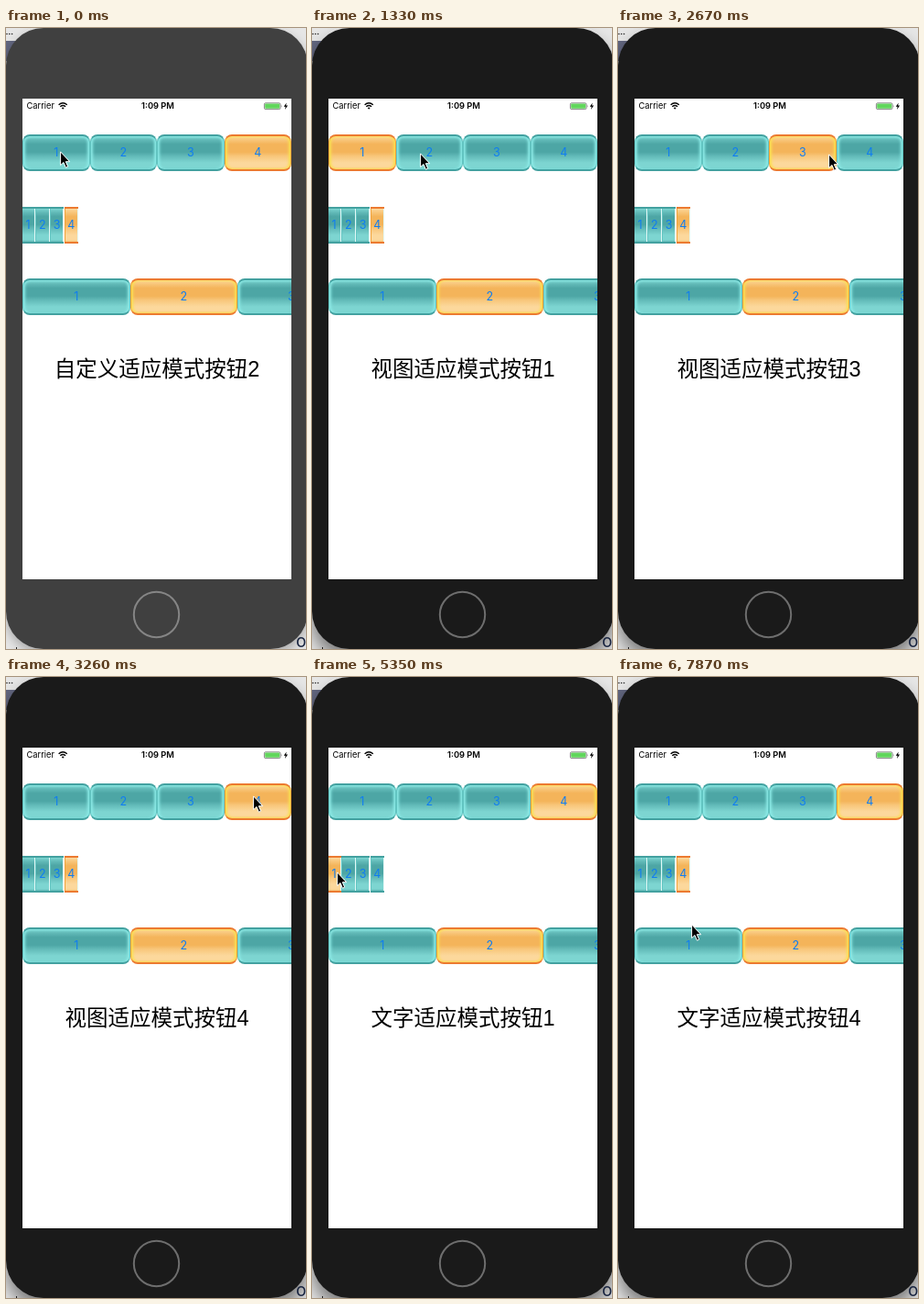
Animation of 328 by 677 pixels, one loop 8000 ms. Source, as an HTML page:

```html
<!DOCTYPE html>
<html lang="zh-CN">
<head>
<meta charset="utf-8">
<style>
html, body { margin: 0; width: 100%; height: 100%; overflow: hidden; background: #e6e6e6 }
svg { position: absolute; left: 0; top: 0 }
#phone { fill: #404040; filter: drop-shadow(0 5px 6px #0004) }
#home { fill: none; stroke: #858585; stroke-width: 2 }
.active #phone { fill: #1a1a1a; filter: drop-shadow(0 11px 9px #0007) }
.active #home { stroke: #6e6e6e }
#screen {
  position: absolute; left: 18px; top: 77px; width: 294px; height: 524px;
  overflow: hidden; background: #fff;
}
.b {
  --edge: #43a1a0; --side: #62c4c1; --glow: #8cebe7;
  --light: #7dd5d1; --mid: #62bab8; --dark: #4da6a5;
  position: absolute; box-sizing: border-box; height: 40px;
  border: solid; border-width: 2px 1px; border-color: var(--edge) var(--side); border-radius: 8px;
  font: 12.5px/36px Inter, sans-serif; text-align: center; color: #0f7df2;
  background: linear-gradient(var(--light), var(--mid) 11%, var(--dark) 24% 48%, var(--mid) 60%, var(--light) 80% 94%, var(--mid));
  box-shadow: inset 2px 0 3px var(--glow), inset -2px 0 3px var(--glow);
}
.b.on {
  --edge: #ec7a30; --side: #f3a238; --glow: #fde04f;
  --light: #fcd89c; --mid: #f8c67a; --dark: #f4b45a;
}
.b.narrow {
  border-width: 2px 0; border-radius: 0;
  box-shadow: inset -1px 0 #e2f8f6, inset 1px 0 var(--side);
}
</style>
</head>
<body>
<svg width="328" height="677">
  <path d="M0 14h14v22H0z" fill="#62667f"/>
  <g fill="#222"><circle cx="1" cy="6.5" r=".8"/><circle cx="3.8" cy="6.5" r=".8"/><circle cx="6.6" cy="6.5" r=".8"/><path d="M11 675h1v2h-1z"/></g>
  <rect id="phone" width="330" height="677" rx="41"/>
  <text x="317" y="675" font-family="Inter, sans-serif" font-size="19" fill="#17233f">o</text>
  <circle id="home" cx="164.5" cy="639.5" r="24.7"/>
</svg>
<div id="screen"></div>
<svg width="328" height="677">
  <g font-family="Inter, sans-serif" font-size="9.3">
    <text x="22.5" y="88.3">Carrier</text>
    <text x="166" y="88.3" text-anchor="middle" font-weight="600">1:09 PM</text>
  </g>
  <path d="M57.6 83.8q4.6-4 9.2 0M59.3 85.8q2.9-2.5 5.8 0" fill="none" stroke="#000" stroke-width="1.4"/>
  <path d="M60.7 87L62.2 88.8 63.7 87q-1.5-1-3 0z"/>
  <rect x="282.4" y="81.8" width="17.6" height="6.8" rx="1.4" fill="#fff" stroke="#555" stroke-width=".7"/>
  <rect x="283.2" y="82.6" width="16" height="5.2" rx=".7" fill="#61d65c"/>
  <path d="M300.8 83.8q1.4 1.4 0 2.8z" fill="#555"/>
  <path d="M306.7 81.5l-3 4.2h2l-.8 3.2 3.2-4.3h-2z"/>
  <text id="label" x="165" y="379.5" text-anchor="middle" font-size="23.5"
    font-family="'Liberation Sans', 'Noto Sans CJK SC', 'Noto Sans CJK', sans-serif"></text>
  <path id="cursor" d="M.6.9V15.6L4 12.5l2.4 5.7 2.3-1-2.4-5.5h4.4z" stroke="#fff" stroke-width="1"/>
</svg>
<script>
const get = id => document.getElementById(id);
const LOOP = 8000, TICK = 148.5, WAKE = 3;
const names = ['视图', '文字', '自定义'];

function makeRow(r, left, width, count) {
  return Array.from({ length: count }, (_, i) => {
    const b = document.createElement('div');
    b.textContent = i + 1;
    b.className = r === 1 ? 'b narrow' : 'b';
    b.style.cssText = `left:${left + i * width}px;top:${39 + 78.5 * r}px;width:${width}px`;
    return get('screen').appendChild(b);
  });
}
const rows = [makeRow(0, 0, 73.5, 4), makeRow(1, -1.9, 15.8, 4), makeRow(2, 0, 117.6, 3)];

// ticks at which buttons 1 to 4 of the first two rows are pressed
const presses = [[4, 10, 17, 22], [34, 39, 45, 50]];

// pointer moves: first tick, last tick, destination
const moves = [
  [6, 14, 217, 139], [17, 21, 270, 129], [23, 31, 24, 210],
  [34, 41, 36, 217], [41, 43, 58, 225], [45, 51, 68, 224], [52, 53, 80, 269]
];

function pointer(k) {
  return moves.reduce(([x, y], [a, b, u, v]) => {
    const f = Math.min(1, Math.max(0, (k - a) / (b - a)));
    return [x + (u - x) * f, y + (v - y) * f];
  }, [59, 134]).map(Math.round);
}

function draw(now) {
  requestAnimationFrame(draw);
  const k = Math.floor((now % LOOP + 10) / TICK);
  const counts = presses.map(ticks => ticks.filter(t => t <= k).length);
  const picked = [counts[0] || 4, counts[1] || 4, 2];
  const last = counts[1] ? 1 : counts[0] ? 0 : 2;

  rows.forEach((row, r) => row.forEach((b, i) => b.classList.toggle('on', picked[r] === i + 1)));
  get('label').textContent = names[last] + '适应模式按钮' + picked[last];
  document.body.classList.toggle('active', k >= WAKE);
  get('cursor').setAttribute('transform', `translate(${pointer(k)})`);
}
draw(performance.now());
</script>
</body>
</html>
```
